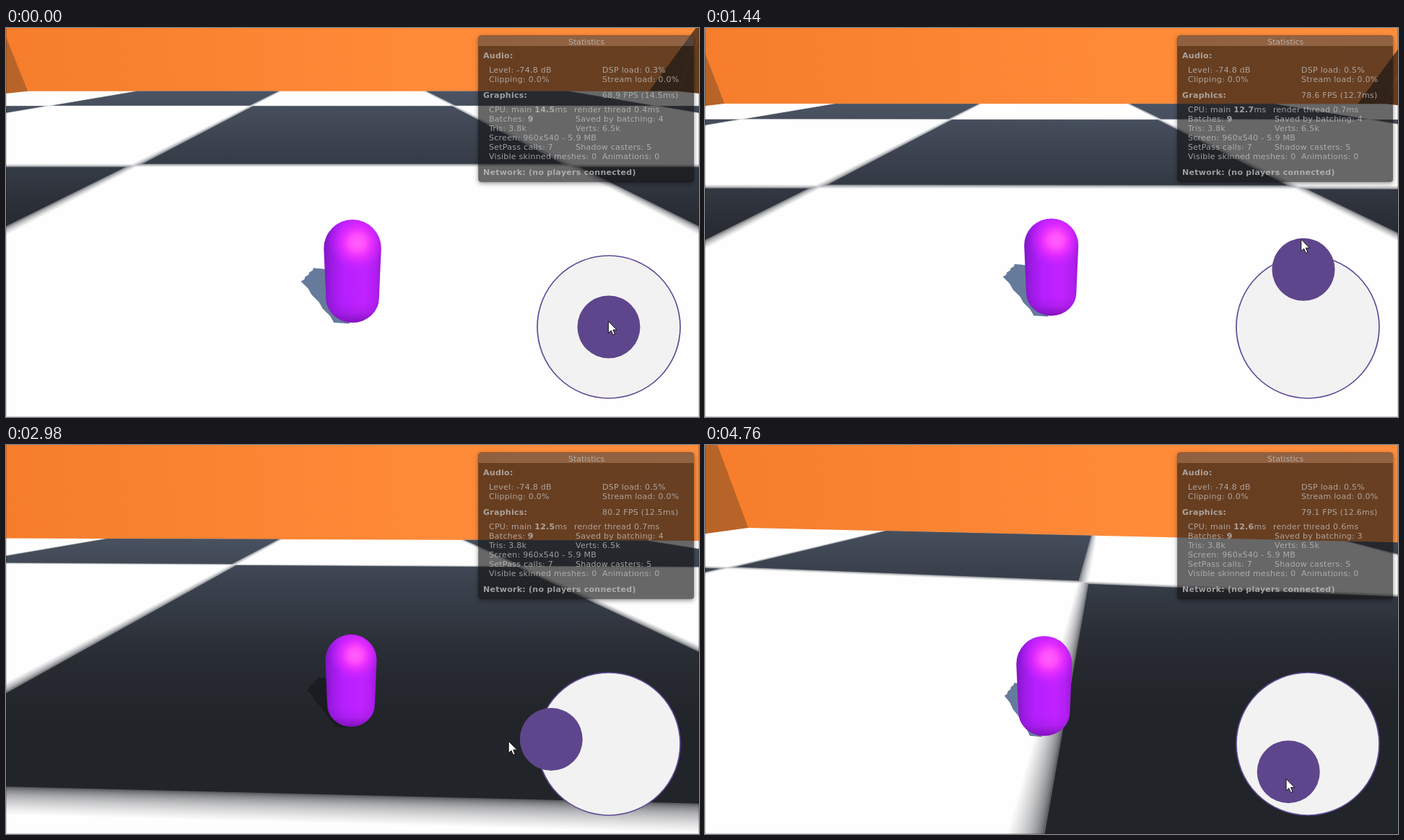
These frames come from a looping animation (960x540 px, 4.81 s). An HTML page with a canvas:

```html
<!DOCTYPE html>
<html lang="en">
<head>
<meta charset="utf-8">
<title>Capsule and joystick</title>
<style>
  html, body { margin: 0; width: 100%; height: 100%; overflow: hidden; background: #fff; }
  canvas { display: block; width: 100vw; height: 100vh; }
</style>
</head>
<body>
<canvas id="stage" width="960" height="540"></canvas>
<script>
const ctx = document.getElementById('stage').getContext('2d');
const W = 960, H = 540, LOOP = 4810;
const FOCAL = 270 / Math.tan(Math.PI / 6);
const EYE = 0.228;   // camera height, in floor tiles
const ROOM = 2.245;  // half the room's width
const NEAR = 0.1;

const ramp = (t, from, to) => Math.max(0, Math.min(1, (t - from) / (to - from)));
const smooth = (t, from, to) => {
  const u = ramp(t, from, to);
  return u * u * (3 - 2 * u);
};

// The camera trails the player: forward first, then turning left
function cameraPose(t) {
  const drift = ramp(t, 700, 2400);
  const turning = Math.max(0, t - 2435) / 1000;
  return {
    x: -0.02 * drift - 0.0812 * turning ** 2,
    z: -0.25 + 0.95 * smooth(t, 730, 4760),
    yaw: 0.0095 * drift + 0.138 * smooth(t, 2435, 4685),
    horizon: 36.6 + 32.6 * (1 - (1 - ramp(t, 600, 2980)) ** 1.75) - 23.2 * ramp(t, 2980, 4760)
  };
}

function makeProjector({ x, z, horizon, yaw }) {
  const pitch = Math.atan((270 - horizon) / FOCAL);
  const cp = Math.cos(pitch), sp = Math.sin(pitch);
  const cy = Math.cos(yaw), sy = Math.sin(yaw);
  return ([wx, wy, wz]) => {
    const dx = wx - x, dz = wz - z, up = wy - EYE;
    const forward = dz * cy - dx * sy;
    return { x: dx * cy + dz * sy, y: up * cp + forward * sp, d: forward * cp - up * sp };
  };
}

function addFace(path, project, corners) {
  const pts = corners.map(project), shown = [];
  pts.forEach((p, i) => {
    const q = pts[(i + 1) % pts.length];
    if (p.d >= NEAR) shown.push(p);
    if ((p.d >= NEAR) !== (q.d >= NEAR)) {
      const u = (NEAR - p.d) / (q.d - p.d);
      shown.push({ x: p.x + (q.x - p.x) * u, y: p.y + (q.y - p.y) * u, d: NEAR });
    }
  });
  shown.forEach((p, i) => {
    const sx = 480 + FOCAL * p.x / p.d, sy = 270 - FOCAL * p.y / p.d;
    i ? path.lineTo(sx, sy) : path.moveTo(sx, sy);
  });
  path.closePath();
}

function fillFace(project, corners, color) {
  const path = new Path2D();
  addFace(path, project, corners);
  ctx.fillStyle = color;
  ctx.fill(path);
}

function addStops(g, stops) {
  stops.forEach(([at, color]) => g.addColorStop(at, color));
  return g;
}
const gradient = (x0, y0, x1, y1, ...stops) =>
  addStops(ctx.createLinearGradient(x0, y0, x1, y1), stops);

const floorQuad = (x0, x1, z0, z1) => [[x0, 0, z0], [x1, 0, z0], [x1, 0, z1], [x0, 0, z1]];

function drawRoom(project, horizon) {
  ctx.fillStyle = gradient(0, 60, W, 0, [0, '#f57d2c'], [0.6, '#ff8a38'], [1, '#ff8e3c']);
  ctx.fillRect(0, 0, W, H);
  fillFace(project, [[2.05, 0, ROOM], [ROOM, 0.49, ROOM], [ROOM, 0, ROOM]], '#6b4020');
  const sideWall = x => [[x, 0, ROOM], [x, 1.2, ROOM], [x, 1.2, -ROOM], [x, 0, -ROOM]];
  fillFace(project, sideWall(-ROOM), '#b86428');
  fillFace(project, sideWall(ROOM), '#6b4020');
  fillFace(project, floorQuad(-ROOM, ROOM, -ROOM, ROOM), '#fefefe');

  // Shrinking layers blend tile edges, with the light side weighted by gamma
  const layers = 18, softness = 0.013;
  const limit = v => Math.max(-ROOM, Math.min(ROOM, v));
  ctx.fillStyle = gradient(0, horizon + 50, 0, horizon + 320,
    [0, '#4b5463'], [0.27, '#3b424e'], [0.65, '#282c33'], [1, '#212429']);
  for (let n = 0; n < layers; n++) {
    const half = 0.5 + softness * (1 - 2 * n / (layers - 1));
    const path = new Path2D();
    for (let i = -2; i <= 2; i++) {
      for (let j = -2; j <= 2; j++) {
        if ((i + j) % 2) {
          addFace(path, project,
            floorQuad(limit(i - half), limit(i + half), limit(j - half), limit(j + half)));
        }
      }
    }
    ctx.globalAlpha = 1 - ((layers - n - 1) / (layers - n)) ** 0.45;
    ctx.fill(path);
  }
  ctx.globalAlpha = 1;
}

function drawShadow(cx, bottom, height, yaw) {
  const outline = [[-0.05, -0.5], [-0.38, -0.53], [-0.5, -0.4], [-0.18, 0], [-0.03, 0.01]];
  const teeth = 6, path = new Path2D();
  outline.slice(1).forEach(([x1, y1], i) => {
    const [x0, y0] = outline[i];
    for (let k = 0; k <= teeth; k++) {
      const x = x0 + (x1 - x0) * k / teeth + 0.015 * (k % 2);
      const y = y0 + (y1 - y0) * k / teeth;
      path.lineTo(cx + x * height * (1 - 1.4 * yaw), bottom + y * height);
    }
  });
  for (const [mode, color] of [['multiply', '#667b9c'], ['lighten', '#191c21']]) {
    ctx.globalCompositeOperation = mode;
    ctx.fillStyle = color;
    ctx.fill(path);
  }
  ctx.globalCompositeOperation = 'source-over';
}

// The capsule looks smaller the more the camera levels out
function drawCapsule({ horizon, yaw }) {
  const level = horizon - 36.6;
  const cx = 480 - 69 * yaw, top = 266 - 0.093 * level, height = 143 - 0.46 * level;
  const bottom = top + height, r = height * 0.278, foot = r * 0.925;
  drawShadow(cx, bottom, height, yaw);

  const body = new Path2D();
  body.ellipse(cx, top + r, r, r, 0, Math.PI, 2 * Math.PI);
  body.ellipse(cx, bottom - foot * 0.92, foot, foot * 0.92, 0, 0, Math.PI);
  body.closePath();
  ctx.fillStyle = gradient(cx - r, 0, cx + r, 0,
    [0, '#8015c4'], [0.12, '#9b1ae2'], [0.34, '#b61fff'], [0.7, '#c122ff'],
    [0.88, '#b41ff4'], [1, '#9c1ad6']);
  ctx.fill(body);
  ctx.fillStyle = gradient(0, bottom - foot * 0.8, 0, bottom,
    [0, 'rgba(60,0,110,0)'], [0.5, 'rgba(60,0,110,.1)'], [1, 'rgba(60,0,110,.45)']);
  ctx.fill(body);
  const gx = cx + r * 0.17, gy = top + height * 0.225;
  ctx.fillStyle = addStops(ctx.createRadialGradient(gx, gy, 0, gx, gy, r), [
    [0, '#ff60fb'], [0.28, '#ff4cfb'], [0.55, 'rgba(238,46,255,.75)'], [1, 'rgba(200,34,255,0)']
  ]);
  ctx.fill(body);
}

// Strings starting with * are bold
function write(x, y, ...parts) {
  for (const part of parts) {
    const bold = part[0] === '*';
    const text = bold ? part.slice(1) : part;
    ctx.font = (bold ? 'bold ' : '') + '11px "DejaVu Sans", sans-serif';
    ctx.fillText(text, x, y);
    x += ctx.measureText(text).width;
  }
}

function drawStats(t) {
  const rates = [68.9, 82.7, 78.6, 81.2, 80.2, 80, 79.1];
  const first = t < 30;
  const turn = first ? 0 : Math.min(6, 1 + Math.floor(Math.max(0, t - 460) / 720));
  const fps = rates[turn].toFixed(1), frame = (1000 / rates[turn]).toFixed(1);
  const panel = new Path2D();
  panel.roundRect(654.5, 10.5, 298.5, 203, 4);

  ctx.save();
  const outside = new Path2D(panel);
  outside.rect(0, 0, W, H);
  ctx.clip(outside, 'evenodd');
  ctx.shadowColor = 'rgba(0,0,0,.45)';
  ctx.shadowBlur = 6;
  ctx.shadowOffsetY = 2;
  ctx.fillStyle = '#000';
  ctx.fill(panel);
  ctx.restore();

  ctx.save();
  ctx.clip(panel);
  ctx.fillStyle = 'rgba(70,70,70,.6)';
  ctx.fillRect(654, 10, 300, 15);
  ctx.fillStyle = 'rgba(20,20,20,.64)';
  ctx.fillRect(654, 25, 300, 190);
  ctx.restore();

  ctx.fillStyle = 'rgba(192,192,192,.78)';
  ctx.letterSpacing = '0px';
  write(779, 23, 'Statistics');
  ctx.letterSpacing = '0.27px';
  write(661, 42, '*Audio:');
  write(669, 62, 'Level: -74.8 dB');
  write(826, 62, `DSP load: ${first ? 0.3 : 0.5}%`);
  write(669, 75, 'Clipping: 0.0%');
  write(826, 75, 'Stream load: 0.0%');
  write(661, 97, '*Graphics:');
  write(826, 97, `${fps} FPS (${frame}ms)`);
  write(669, 117, 'CPU: main ', '*' + frame, 'ms');
  write(787, 117, `render thread ${first ? 0.4 : turn < 6 ? 0.7 : 0.6}ms`);
  write(669, 130, 'Batches: ', '*9');
  write(789, 130, `Saved by batching: ${turn < 5 ? 4 : 3}`);
  write(669, 143, 'Tris: 3.8k');
  write(789, 143, 'Verts: 6.5k');
  write(669, 156, 'Screen: 960x540 - 5.9 MB');
  write(669, 169, 'SetPass calls: 7');
  write(789, 169, 'Shadow casters: 5');
  write(669, 182, 'Visible skinned meshes: 0');
  write(826, 182, 'Animations: 0');
  write(661, 204, '*Network: (no players connected)');
}

function disc(x, y, r, color) {
  ctx.beginPath();
  ctx.arc(x, y, r, 0, 2 * Math.PI);
  ctx.fillStyle = color;
  ctx.fill();
}

const POINTER = new Path2D('M0 0V16.5L3.8 13L6.4 19L9 17.9L6.5 12H11.7Z');

// The knob follows the pointer but stays within its reach
function drawStick(t) {
  const push = smooth(t, 250, 560);
  const swing = smooth(t, 2440, 2900);
  const back = ramp(t, 2900, 4760) ** 2;
  const pull = 8 + 114 * push + 17 * swing - 82 * back;
  const reach = Math.max(0, Math.min(80, pull - 10));
  const angle = -94.3 - 81 * swing - 60 * back;
  const polar = (degrees, r) => {
    const a = degrees * Math.PI / 180;
    return [835 + r * Math.cos(a), 415 + r * Math.sin(a)];
  };

  disc(835, 415, 99, '#f2f2f2');
  ctx.strokeStyle = '#624c98';
  ctx.lineWidth = 1.7;
  ctx.stroke();
  disc(...polar(angle, reach), 43.5, '#5e468c');

  ctx.save();
  ctx.translate(...polar(angle - 3 * swing, pull));
  ctx.fillStyle = '#fff';
  ctx.fill(POINTER);
  ctx.strokeStyle = '#111';
  ctx.lineWidth = 1;
  ctx.stroke(POINTER);
  ctx.restore();
}

function draw(t) {
  const pose = cameraPose(t);
  drawRoom(makeProjector(pose), pose.horizon);
  drawCapsule(pose);
  ctx.fillStyle = 'rgba(0,0,0,.2)';
  ctx.fillRect(0, 0, 1, H);
  ctx.fillRect(W - 1, 0, 1, H);
  ctx.fillRect(1, H - 1, W - 2, 1);
  drawStats(t);
  drawStick(t);
}

const start = performance.now();
function tick() {
  draw((performance.now() - start) % LOOP);
  requestAnimationFrame(tick);
}
tick();
</script>
</body>
</html>
```
